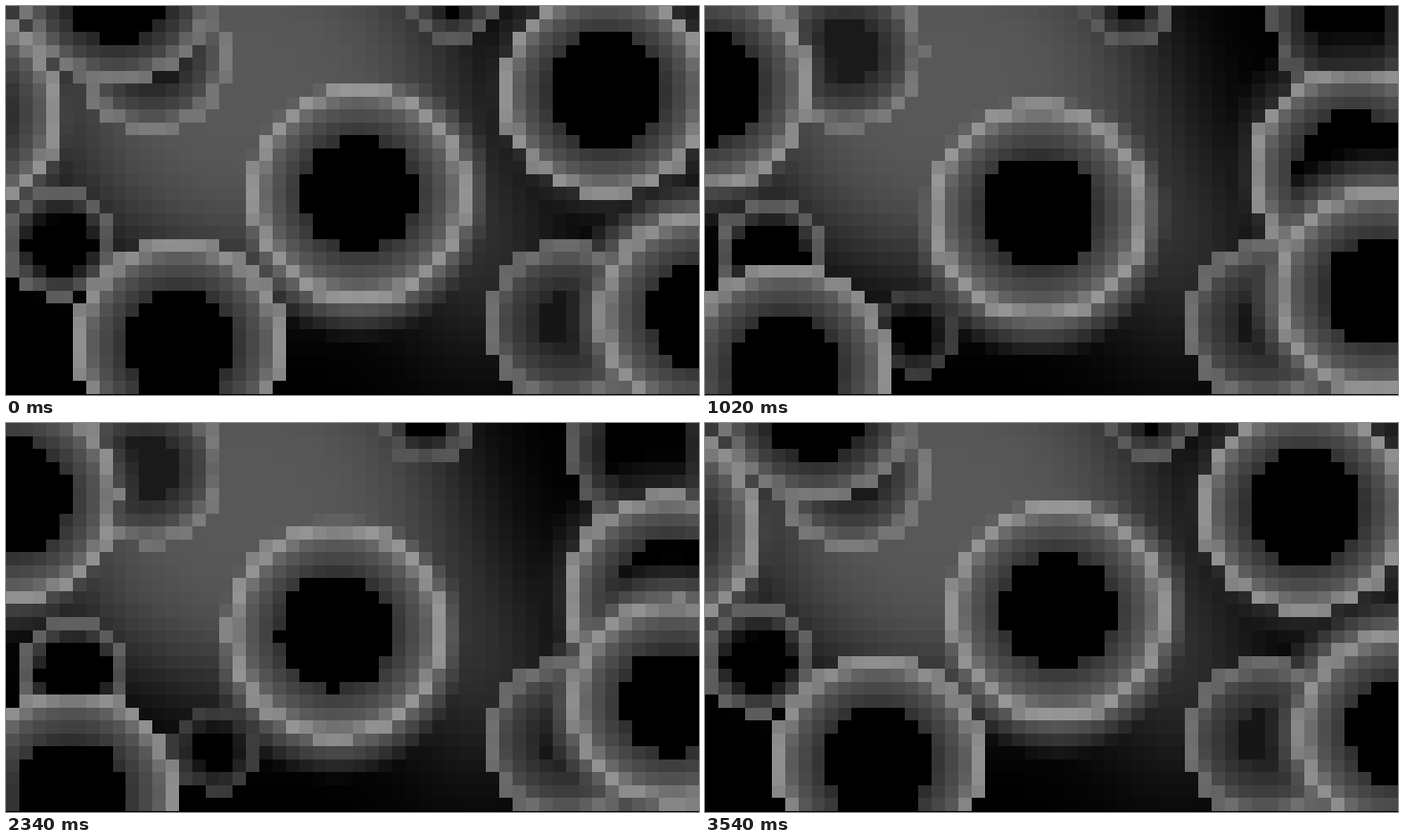
These frames come from a looping animation (777 by 437 pixels, 3600 ms). An HTML page with a canvas:

```html
<!DOCTYPE html>
<html lang="en">
<head>
<meta charset="utf-8">
<title>Drifting cells</title>
<style>
  html, body { margin: 0; width: 100%; height: 100%; overflow: hidden; background: #000; }
  canvas { display: block; width: 777px; height: 436px; image-rendering: pixelated; }
</style>
</head>
<body>
<canvas id="stage" width="52" height="30"></canvas>
<script>
const COLS = 52, ROWS = 30, WIDTH = 777, HEIGHT = 436;
const STEP = 60, STEPS = 60;
const ctx = document.getElementById('stage').getContext('2d');
const image = ctx.createImageData(COLS, ROWS);

// Back to front. x and y: start, speed, acceleration per step.
const cells = [
  { x: [500, -1.6, .008], y: [-8, .35, 0], r: 43, ring: 92, core: .42 },
  { x: [235, 0, 0], y: [367, 0, 0], r: 43, ring: 62, core: .58 },
  { x: [768, -3.89, .068], y: [-112, 10.04, -.152], r: 81, ring: 90, core: .56 },
  { x: [60, .8, 0], y: [266, .75, 0], r: 57, ring: 98, core: .68 },
  { x: [627, 0, 0], y: [356, 0, 0], r: 83, ring: 112, core: .36, floor: 22 },
  { x: [164, -.3, 0], y: [56, -.25, 0], r: 81, ring: 125, core: .45, floor: 26 },
  { x: [-58, 3.8, -.028], y: [120, -1.8, 0], r: 113, ring: 145, core: .57, glow: 85 },
  { x: [125, .7, 0], y: [-23, -6.2, 0], r: 104, ring: 120, core: .62 },
  { x: [672, 1.6, .1], y: [96, 6.5, -.073], r: 112, ring: 145, core: .58, glow: 50 },
  { x: [780, -1.05, -.027], y: [347, -.92, -.038], r: 110, ring: 146, core: .54, glow: 115 },
  { x: [194, -6.6, .029], y: [381, .26, .079], r: 112, ring: 143, core: .55 },
  { x: [396, -1.36, .004], y: [211, 1.38, -.011], r: 117, ring: 150, core: .55, glow: 115 }
];

const at = ([start, speed, accel], n) => start + speed * n + accel * n * n;
const ellipse = (x, y, cx, cy, w, h) => ((x - cx) / w) ** 2 + ((y - cy) / h) ** 2;

function haze(x, y) {
  return 88 * Math.exp(-(ellipse(x, y, 270, 90, 245, 225) ** 2)) +
    44 * Math.exp(-ellipse(x, y, 530, 270, 100, 135));
}

function shade(cell, distance, under) {
  const { r, ring, core, floor = 0, glow = 0 } = cell;
  const edge = distance - r, u = distance / r;
  if (edge > 7.5) return Math.max(under, glow * (1 - edge / 52));
  if (u < core) return floor;
  const slope = Math.min(1, (u - core) / (1 - core));
  return ring * (.32 + .42 * slope + .26 * Math.exp(-((edge / 9) ** 2)));
}

function draw(n) {
  const placed = cells.map(cell => ({ cell, x: at(cell.x, n), y: at(cell.y, n) }));
  for (let i = 0; i < COLS * ROWS; i++) {
    const x = (i % COLS + .5) * WIDTH / COLS;
    const y = (Math.floor(i / COLS) + .5) * HEIGHT / ROWS;
    let level = haze(x, y);
    for (const p of placed) level = shade(p.cell, Math.hypot(x - p.x, y - p.y), level);
    image.data.set([level, level, level, 255], i * 4);
  }
  ctx.putImageData(image, 0, 0);
}

function frame() {
  const step = Math.floor(performance.now() / STEP) % STEPS;
  draw(Math.min(step, STEPS - 1 - step));
  requestAnimationFrame(frame);
}
frame();
</script>
</body>
</html>
```
